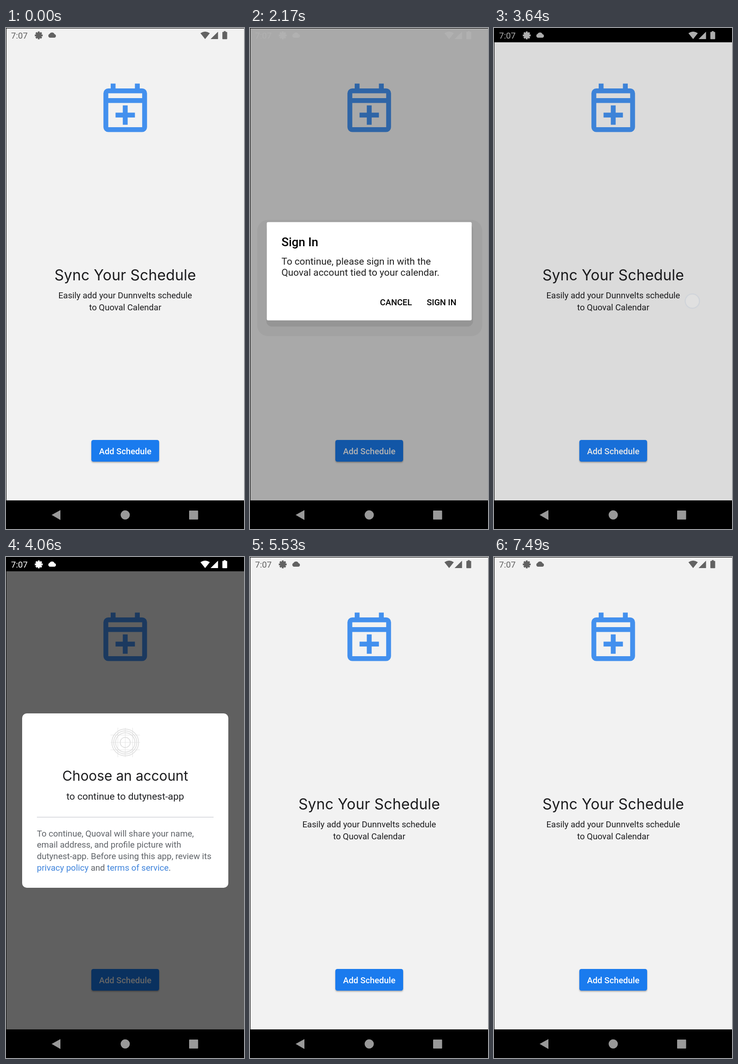
Write an HTML page that moves like this. It is 516 by 1086 pixels and loops after 8000 ms.

```html
<!DOCTYPE html>
<html lang="en">
<head>
<meta charset="utf-8">
<title>Schedule sync</title>
<style>
  html, body { margin: 0; width: 100%; height: 100%; overflow: hidden; background: #f2f2f2; }
  svg { display: block; width: 516px; height: 1086px; }
  text { font-family: Roboto, sans-serif; white-space: pre; }
  .head { font-family: Inter, sans-serif; fill: #1c1c1e; }
  .med { font-weight: 500; }
  .button { fill: #1a7bee; filter: drop-shadow(0 2px 1.5px rgba(0, 0, 0, .3)); }
</style>
</head>
<body>
<svg id="stage" viewBox="0 0 516 1086" xmlns="http://www.w3.org/2000/svg"></svg>
<script>
const LOOP = 8000, TICK = 70;
const MID = 258.5, MID_Y = 533;

const text = (x, y, size, str, attrs = '') =>
  `<text x="${x}" y="${y}" font-size="${size}" ${attrs}>${str}</text>`;
const centered = (y, size, str, attrs = '') =>
  text(MID, y, size, str, `text-anchor="middle" ${attrs}`);
const rect = (x, y, w, h, attrs = '') =>
  `<rect x="${x}" y="${y}" width="${w}" height="${h}" ${attrs}/>`;
const circle = (x, y, r, attrs = '') =>
  `<circle cx="${x}" cy="${y}" r="${r}" ${attrs}/>`;
const button = (y, w, label) =>
  rect(MID - w / 2, y, w, 47, 'rx="4.5" class="button"') +
  centered(y + 30.5, 18.4, label, 'class="med" fill="#fff"');

const calendar = `<path transform="translate(195.5 110) scale(5.25)" fill="#4390ee" fill-rule="evenodd" d="
  M16 2h2v2h1a2 2 0 0 1 2 2v14a2 2 0 0 1-2 2H5a2 2 0 0 1-2-2V6a2 2 0 0 1 2-2h1V2h2v2h8z
  M5 6v2h14V6z M5 10v10h14V10z M11 11h2v3h3v2h-3v3h-2v-3H8v-2h3z"/>`;

const home = calendar +
  centered(547, 32, 'Sync Your Schedule', 'class="head" letter-spacing=".15"') +
  centered(586, 18.6, 'Easily add your Dunnvelts schedule', 'fill="#1c1c1e"') +
  centered(612, 18.6, 'to Quoval Calendar', 'fill="#1c1c1e"') +
  button(893, 147, 'Add Schedule');

const result =
  centered(473, 32, 'All Done', 'class="head"') +
  centered(517, 18.6, 'Your schedule has been added', 'fill="#1c1c1e"') +
  `<g id="back">${button(568, 106, 'Go Back')}</g>`;

const signIn =
  rect(14, 415, 491, 254, 'rx="24" opacity=".04"') +
  rect(34, 424, 451, 224, 'rx="12" opacity=".08"') +
  rect(35, 420, 447, 214.5, 'rx="3" fill="#fff"') +
  text(67, 472.5, 26.2, 'Sign In', 'class="med"') +
  text(67, 512.5, 21, 'To continue, please sign in with the', 'fill="#202020"') +
  text(67, 537.5, 21, 'Quoval account tied to your calendar.', 'fill="#202020"') +
  text(282, 601, 18.4, 'CANCEL', 'class="med"') +
  text(384, 601, 18.4, 'SIGN IN', 'class="med"');

// Concentric placeholder mark with a crosshair grid
const grid = [-16, 0, 16].map(d =>
  `M${MID + d} 370v64M${MID - 32} ${402 + d}h64`).join('');
const mark = `<g fill="none" stroke="#dcdcdc" stroke-width="1.5">
  ${[11, 21, 25, 29].map(r => circle(MID, 402, r)).join('')}
  <path d="${grid}" stroke-width=".7"/></g>`;

const rule = y => rect(67, y - 1, 383, 1.6, 'fill="#dadce0"');
const link = str => `<tspan fill="#3f84dc">${str}</tspan>`;
const terms = [
  'To continue, Quoval will share your name,',
  'email address, and profile picture with',
  'dutynest-app. Before using this app, review its',
  `${link('privacy policy')} and ${link('terms of service')}.`
].map((line, i) => text(67, 605.5 + i * 24.8, 18.6, line, 'fill="#5f6368"')).join('');

const accounts =
  circle(88, 535.5, 21, 'fill="#7b8fa8"') +
  text(88, 543, 21, 'A', 'text-anchor="middle" fill="#fff"') +
  text(125, 531, 18.4, 'Alina Morvane', 'class="med" fill="#3c4043"') +
  text(125, 553, 15.8, 'alina.morvane@example.com', 'fill="#5f6368"') +
  rule(577) +
  circle(88, 613, 6, 'fill="#5f6368"') +
  '<path d="M76 631v-3q0-7 12-7t12 7v3z" fill="#5f6368"/>' +
  text(125, 625, 18.4, 'Use another account', 'class="med" fill="#3c4043"');

const picker =
  rect(35, 339, 447, 378, 'id="card" rx="10" fill="#fff"') +
  `<g id="top">${mark}
    ${centered(485, 29.8, 'Choose an account', 'class="head"')}
    ${centered(526, 21, 'to continue to dutynest-app', 'fill="#202124"')}
    ${rule(564)}</g>
  <g id="list">${accounts}</g>
  <g id="foot">${rule(564)}${terms}</g>`;

const teeth = [0, 45, 90, 135].map(a =>
  rect(69, 7.5, 4, 17, `transform="rotate(${a} 71 16)"`)).join('');
const status = text(11, 23, 18.6, '7:07') + teeth +
  circle(71, 16, 4.6, 'fill="none" stroke-width="3.6" class="ring"') +
  `<path d="M95 21a4.3 4.3 0 0 1-.5-8.2a6 6 0 0 1 10.8.6a3.9 3.9 0 0 1-.2 7.6z
    M431.7 24L421.5 11.3q10.2-7 20.4 0z M443.5 24L459.7 8v16z
    M472.3 8.5v-1.7h4v1.7h2.2q1 0 1 1v13.8q0 1-1 1h-8.4q-1 0-1-1V9.500q0-1 1-1z"/>`;

const nav = rect(0, 1024, 516, 62) +
  `<g fill="#999"><path d="M99 1055.500L118 1045v21.500z"/>
  ${circle(MID, 1055.5, 10)}${rect(397, 1046, 19.5, 19.5, 'rx="1"')}</g>`;

document.getElementById('stage').innerHTML =
  rect(0, 0, 516, 1086, 'fill="#f2f2f2"') +
  `<g id="home">${home}</g><g id="result">${result}</g>` +
  rect(0, 0, 516, 31, 'id="bar"') +
  rect(0, 0, 516, 1024, 'id="dim"') +
  `<g id="signIn">${signIn}</g><g id="picker">${picker}</g><g id="status">${status}</g>
  <g id="touch">${circle(0, 0, 14.5, 'fill="#fff" fill-opacity=".6"')}
    ${circle(0, 0, 15.5, 'fill="none" stroke="#8fa9d0" stroke-opacity=".55" stroke-width="2.4"')}</g>` +
  nav + rect(0, 0, 1, 1086) + rect(0, 0, 516, 1);

const el = {};
document.querySelectorAll('[id]').forEach(n => el[n.id] = n);
const set = (id, attrs) => {
  for (const k in attrs) el[id].setAttribute(k, attrs[k]);
};

const clamp = p => Math.min(1, Math.max(0, p));
const easeOut = (p, n) => 1 - (1 - p) ** n;
// Linear track through [time, value] pairs; equal times give a hard step
function track(t, keys) {
  for (let i = 1; i < keys.length; i++) {
    const [t0, a] = keys[i - 1], [t1, b] = keys[i];
    if (t < t1) return a + (b - a) * clamp((t - t0) / (t1 - t0));
  }
  return keys[keys.length - 1][1];
}
const show = (id, opacity) =>
  set(id, { opacity, display: opacity > 0 ? 'inline' : 'none' });
const zoom = (id, s, y = MID_Y) =>
  set(id, { transform: `translate(${MID} ${y}) scale(${s}) translate(${-MID} ${-y})` });

const DIM = [[1960, 0], [2380, .6], [3430, .6], [3640, .095], [3850, .6], [5110, .6], [5530, 0]];
const ICONS = [[1960, 98], [2380, 255], [3430, 255], [3640, 174], [3850, 255], [5110, 255], [5530, 98]];
const BAR = [[0, 0], [3640, 0], [3640, 1], [5180, 1], [5530, 0]];
const SIGN_IN = [[1960, 0], [2170, 1], [3430, 1], [3640, 0]];
const PICKER = [[0, 0], [4060, 0], [4060, 1], [4970, 1], [5250, 0]];
// x, y, start of fade in, fully shown, start of fade out
const TAPS = [
  [272, 915, 1820, 1820, 1820],
  [430, 592, 3220, 3220, 3430],
  [236, 528, 4760, 4900, 4970],
  [260, 592, 6930, 6930, 7140]
];

function drawScreens(t) {
  const go = clamp((t - 5810) / 280), back = clamp((t - 7140) / 350);
  const leaving = t < 6500;
  zoom('home', leaving ? 1 + .15 * easeOut(go, 2) : 1 + .1 * (1 - easeOut(back, 3)));
  show('home', leaving ? 1 - go : back);
  zoom('result', leaving ? .85 + .15 * easeOut(go, 2) : 1 - .15 * easeOut(back, 3));
  show('result', leaving ? go : clamp(1 - back * 1.5));
  show('back', t >= 6930 ? .85 : 1);
}

function drawDialogs(t) {
  show('dim', track(t, DIM));
  show('bar', track(t, BAR));
  const g = Math.round(track(t, ICONS)), ink = `rgb(${g},${g},${g})`;
  set('status', { fill: ink, stroke: 'none' });
  el.status.querySelector('.ring').setAttribute('stroke', ink);

  show('signIn', track(t, SIGN_IN));
  zoom('signIn', .9 + .1 * easeOut(clamp((t - 1960) / 280), 2), 527);

  const grow = easeOut(clamp((t - 4060) / 350), 2);
  show('picker', track(t, PICKER));
  set('card', { y: 339 - 70 * grow, height: 378 + 166 * grow });
  set('top', { transform: `translate(0 ${-70 * grow})` });
  set('foot', { transform: `translate(0 ${96 * grow})` });
  show('list', clamp(grow * 2 - 1));
}

function drawTouch(t) {
  const tap = TAPS.find(([, , start, , off]) => t >= start && t < off + 280);
  if (!tap) return show('touch', 0);
  const [x, y, start, full, off] = tap;
  set('touch', { transform: `translate(${x} ${y})` });
  show('touch', track(t, [[start, 0], [full, 1], [off, 1], [off + 280, 0]]));
}

function draw(ms) {
  const t = Math.floor(ms % LOOP / TICK) * TICK;
  drawScreens(t);
  drawDialogs(t);
  drawTouch(t);
}

const began = performance.now();
function frame() {
  draw(performance.now() - began);
  requestAnimationFrame(frame);
}
frame();
</script>
</body>
</html>
```
